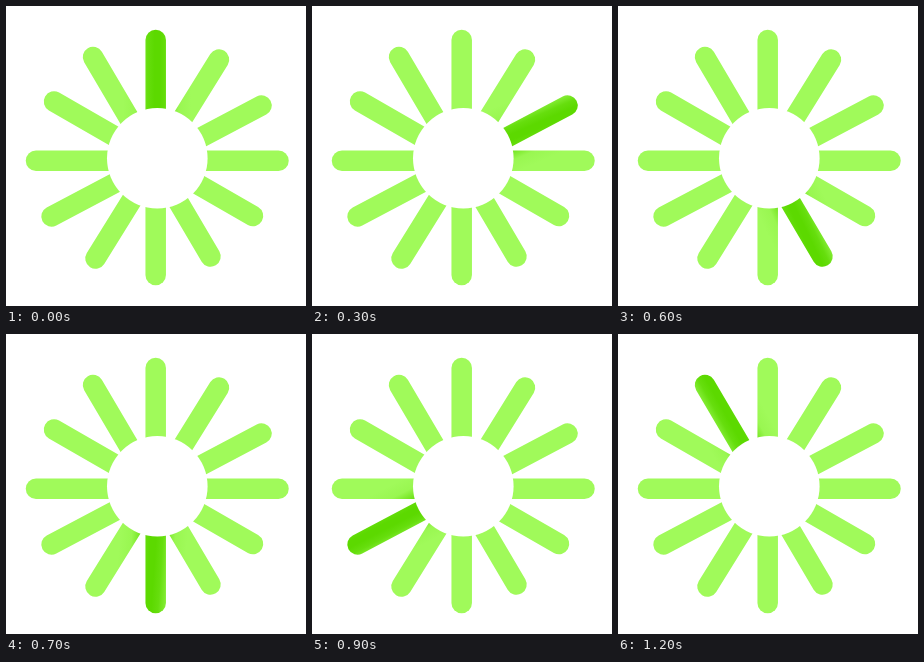
Animation of 300x300 px, one loop 1.3 s. Source, as an HTML page with a canvas:

```html
<!DOCTYPE html>
<html>
<head>
<meta charset="utf-8">
<style>
html, body { margin: 0; width: 100%; height: 100%; overflow: hidden; background: #fff; }
canvas { display: block; }
</style>
</head>
<body>
<canvas id="stage" width="300" height="300"></canvas>
<script>
const ctx = document.getElementById('stage').getContext('2d');
const STEP = 100, STEPS = 13;
const CX = 151, CY = 152;

// Opposite spokes share one line: x1, y1, x2, y2
const bars = [
  [149.7, 34, 149.7, 269],
  [213, 53.5, 89.5, 252.5],
  [255.5, 99.5, 45.5, 210.5],
  [272.5, 154.7, 30, 154.7],
  [247, 210, 48, 95.5],
  [204.5, 250.5, 87, 51]
];

// Soft beam, fading to both sides of its axis
const beam = ctx.createLinearGradient(-34, 0, 34, 0);
[[0, 0], [.18, .1], [.36, .85], [.46, 1], [.54, 1], [.64, .85], [.82, .1], [1, 0]]
  .forEach(([at, alpha]) => beam.addColorStop(at, `rgba(92,217,0,${alpha})`));

function beamAngle(step) {
  return step ? 8 + (step - 1) * 352 / 12 : 0;
}

function draw(step) {
  ctx.clearRect(0, 0, 300, 300);
  ctx.strokeStyle = '#a0fa5a';
  ctx.lineWidth = 20.5;
  ctx.lineCap = 'round';
  for (const [x1, y1, x2, y2] of bars) {
    ctx.beginPath();
    ctx.moveTo(x1, y1);
    ctx.lineTo(x2, y2);
    ctx.stroke();
  }

  // Tint only the spokes already drawn
  ctx.save();
  ctx.globalCompositeOperation = 'source-atop';
  ctx.translate(CX, CY);
  ctx.rotate(beamAngle(step) * Math.PI / 180);
  ctx.fillStyle = beam;
  ctx.fillRect(-34, -160, 68, 160);
  ctx.restore();

  ctx.fillStyle = '#fff';
  ctx.beginPath();
  ctx.arc(151.3, 152.3, 50.3, 0, 7);
  ctx.fill();
}

const start = performance.now();
function tick() {
  draw(Math.floor((performance.now() - start) / STEP) % STEPS);
  requestAnimationFrame(tick);
}
tick();
</script>
</body>
</html>
```
